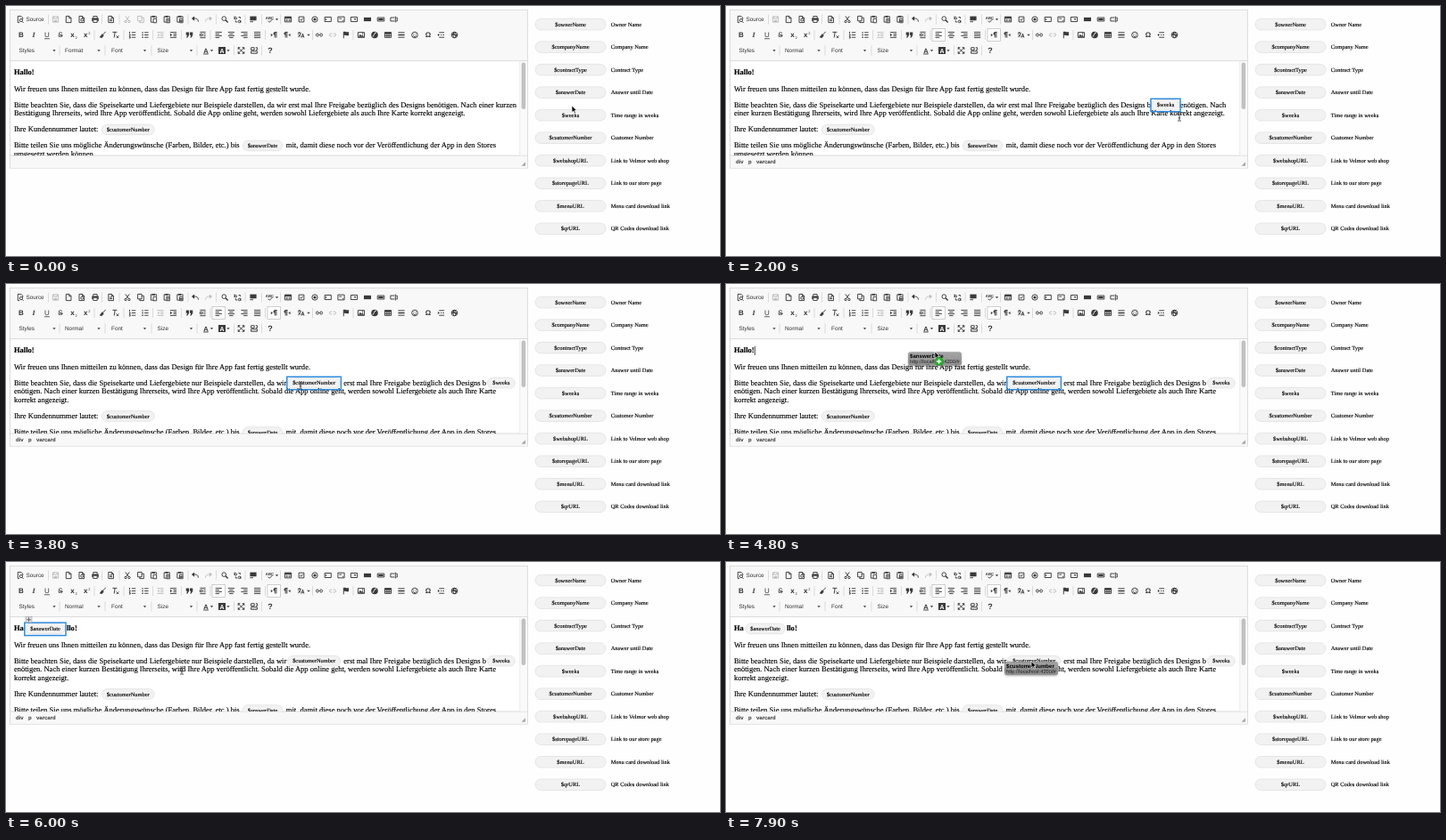
These frames come from a looping animation (800 by 281 pixels, 8 s). An HTML page:

```html
<!DOCTYPE html>
<html lang="de">
<head>
<meta charset="utf-8">
<title>Template editor</title>
<style>
html, body { margin: 0; width: 100%; height: 100%; overflow: hidden; background: #fefefe; }
svg { display: block; width: 100%; height: 100%; }
text { text-rendering: geometricPrecision; white-space: pre; fill: #000; }
.body { font: 8.52px "Liberation Serif", "Times New Roman", serif; stroke: #000; stroke-width: .14; }
.small { font: 6.45px "Liberation Serif", "Times New Roman", serif; stroke: #000; stroke-width: .14; }
.ui { font: 6.4px "Liberation Sans", Arial, sans-serif; fill: #333; }
.b { font-weight: bold; }
.mid { text-anchor: middle; }
.pill { fill: #f2f2f2; stroke: #dfdfdf; stroke-width: .7; }
.line { fill: none; stroke: #3a3a3a; stroke-width: 1.05; }
.solid { fill: #3a3a3a; }
.off { opacity: .3; }
.sep { stroke: #cfcfcf; stroke-width: .7; }
.sel { fill: none; stroke: #2f8ce0; stroke-width: 1.5; }
</style>
</head>
<body>
<svg id="stage" viewBox="0 0 800 281" xmlns="http://www.w3.org/2000/svg"></svg>
<script>
const text = (x, y, s, cls, style = '') => `<text x="${x}" y="${y}" class="${cls}" style="${style}">${s}</text>`;
const rect = (x, y, w, h, attrs) => `<rect x="${x}" y="${y}" width="${w}" height="${h}" ${attrs}/>`;
const ring = (x, y, r) => `M${x - r} ${y}a${r} ${r} 0 1 0 ${2 * r} 0a${r} ${r} 0 1 0 ${-2 * r} 0z`;
const box = (x, y, w, h) => `M${x} ${y}h${w}v${h}h${-w}z`;
const group = (id, inner, show) => `<g id="${id}" ${show ? '' : 'display="none"'}>${inner}</g>`;

// ---- toolbar ----
const ROWS = [15, 32.5, 50];
const icon = (row, x, line, solid = '', id = '', off = false) =>
  `<g ${id && `id="${id}"`} ${off ? 'class="off"' : ''} transform="translate(${x} ${ROWS[row]}) scale(.9)">` +
  `<path class="line" d="${line}"/><path class="solid" d="${solid}"/></g>`;
const glyph = (row, x, s, style = '') => text(x, ROWS[row] + 2.9, s, 'ui mid', 'font-size:8px;' + style);
const seps = (row, xs) => xs.map(x =>
  `<path class="sep" d="M${x} ${ROWS[row] - 5.5}v11"/>`).join('');
const arrow = (row, x) => `<path class="solid" d="M${x - 1.7} ${ROWS[row] - .8}h3.4l-1.7 2z"/>`;

const PAGE = 'M-3-4h4l2.3 2.3V4h-6.3zM.8-4v2.5h2.5';
const CLIP = 'M-1-3.5h-2.5v7h3M1.5-3.5h2v2M-.5-.8h4v5h-4z';
const CLIP_TOP = box(-2, -4.5, 3.6, 2);
const FRAME = box(-4, -3.2, 8, 6.4);
const UNDO = 'M3.8 3C4-.6 1-1.4-2-1.1', UNDO_TIP = 'M-4.6-1l3.6-3v6z';
const REDO = 'M-3.8 3C-4-.6-1-1.4 2-1.1', REDO_TIP = 'M4.6-1l-3.6-3v6z';

function rowOne() {
  return icon(0, 16, 'M-3-4h4l2 2V0M-3-4v8h2' + ring(1, 1.2, 1.8) + 'M2.3 2.6l1.7 1.7') +
    text(22.4, 17.4, 'Source', 'ui') +
    icon(0, 55.5, box(-3.5, -3.5, 7, 7) + 'M-2-3.5v2.6h4v-2.6', box(-2, 1, 4, 2.5), '', true) +
    icon(0, 70, PAGE) +
    icon(0, 84.7, PAGE + ring(.6, .8, 1.6)) +
    icon(0, 100, 'M-2.4-1.5v-2.3h4.8v2.3M-2.4 1.2v2.6h4.8v-2.6', 'M-4.2-1.8h8.4v4.4h-1.5v-1.8h-5.4v1.8h-1.5z') +
    icon(0, 117.5, PAGE + 'M-1.6 0h3.4M-1.6 1.8h3.4') +
    icon(0, 136, 'M-2.5-4L1.6 1.6M2.5-4L-1.6 1.6' + ring(-2.2, 2.8, 1.3) + ring(2.2, 2.8, 1.3), '', 'cut', true) +
    icon(0, 151, box(-3.8, -4, 5, 6) + 'M1.2-2h2.5v6h-5v-2', '', 'copy', true) +
    icon(0, 165.5, CLIP, CLIP_TOP) +
    icon(0, 180.3, CLIP + 'M.4 1h2.2M1.5 1v2.2', CLIP_TOP) +
    icon(0, 195, CLIP + 'M.3 1l.7 2 .6-2 .6 2 .6-2', CLIP_TOP) +
    icon(0, 212, UNDO, UNDO_TIP) + icon(0, 227, REDO, REDO_TIP, '', true) +
    icon(0, 245, ring(-.8, -1, 2.6), 'M.5 1.5l1.1-1.1 3 2.9-1.2 1.2z') +
    icon(0, 259.5, 'M-3.8-4v4' + ring(-2.3, -1.3, 1.3) + ring(2.2, 2.7, 1.4) + 'M3.7 1.1v3.2M-2.5 1.5v1.8h2.3M1.2-2.8h2v1.8') +
    icon(0, 277, 'M-4 3h4', box(-4, -3.8, 8, 5.2)) +
    text(295.5, 14.6, 'ABC', 'ui mid b', 'font-size:4.3px') +
    icon(0, 296, 'M-2.5 1.8l1.8 1.8 3.6-3.8') + arrow(0, 303.5) +
    icon(0, 316, FRAME + 'M-2.5.3h2M.8.3h2M-2.5 1.9h2M.8 1.9h2', box(-4, -3.2, 8, 2.2)) +
    icon(0, 331, box(-3.2, -3.2, 6.4, 6.4) + 'M-1.6 0l1.2 1.4 2.2-2.9') +
    icon(0, 346, ring(0, 0, 3.5), ring(0, 0, 1.8)) +
    icon(0, 360.7, box(-4, -2.8, 8, 5.6) + 'M-2.3-1.2v2.4') +
    icon(0, 375.5, FRAME + 'M-2.4-1h3', 'M3 .6v1.7h-1.7z') +
    icon(0, 390, box(-4, -2.8, 8, 5.6), 'M-.4-1h3.2l-1.6 2z') +
    icon(0, 405, '', box(-4.5, -2.4, 9, 4.8)) +
    icon(0, 420, box(-4.2, -2.2, 8.4, 4.4), box(-3, -1.2, 6, 2.4)) +
    icon(0, 434.5, 'M1-2.2h-5v4.4h5M3-2.2h1.2v4.4h-1.2M2-3.8v7.6') +
    seps(0, [47.5, 107.5, 127, 204, 235.5, 268, 286.5, 307.5]);
}

function rowTwo() {
  const lines = (x, w) => 'M-4-3.4h8M-4 1.1h8' + `M${x}-1.1h${w}M${x} 3.4h${w}`;
  const para = 'M1-3.4v6.8M2.8-3.4v6.8M3.6-3.4H.6', bowl = 'M1-3.6a2 2 0 0 0 0 4z';
  return group('active',
      [231, 293].map(x => rect(x, 25.5, 14.5, 14, 'fill="#fff" stroke="#bcbcbc" stroke-width=".7"')).join('')) +
    glyph(1, 17, 'B', 'font-weight:bold') +
    glyph(1, 31, 'I', 'font-style:italic;font-weight:bold;font-family:\'Liberation Serif\',serif') +
    glyph(1, 46, 'U', 'text-decoration:underline') + glyph(1, 61, 'S', 'text-decoration:line-through') +
    glyph(1, 74.5, 'x', 'font-weight:bold') + text(77.4, 37.2, '2', 'ui', 'font-size:4px') +
    glyph(1, 89.3, 'x', 'font-weight:bold') + text(92.2, 32, '2', 'ui', 'font-size:4px') +
    icon(1, 108.5, 'M3.5-4L0-.2', 'M-.8-1.4L1.4.8-1.2 4-4.2 3z') +
    icon(1, 123, 'M-4-3.5h5.5M-1-3.5l-1 6.8M.7 1l3 3M3.7 1l-3 3') +
    icon(1, 141.5, 'M-.8-3h5M-.8 0h5M-.8 3h5M-3.3-4v2.2M-4-.5h1.4v1.2h-1.4M-4 2.2h1.4v1.8h-1.4') +
    icon(1, 156, 'M-1-3h5M-1 0h5M-1 3h5', box(-4, -3.7, 1.5, 1.5) + box(-4, -.7, 1.5, 1.5) + box(-4, 2.3, 1.5, 1.5)) +
    icon(1, 173, 'M-4-3.2h8M0-1h4M0 1h4M-4 3.2h8', 'M-1.5-2v4l-2.4-2z', '', true) +
    icon(1, 187.5, 'M-4-3.2h8M0-1h4M0 1h4M-4 3.2h8', 'M-3.9-2v4l2.4-2z') +
    icon(1, 205.5, '', 'M-4.2-3.2h3.7v3.4l-1.8 3.1h-1.5l1.1-2.9h-1.5zM.5-3.2h3.7v3.4l-1.8 3.1h-1.5l1.1-2.9h-1.5z') +
    icon(1, 220.5, 'M-3.5-3.5h7M-3.5 3.5h7M-3.5-1.2h3v2.4h-3zM1-1.2h2.5M1 1.2h2.5') +
    icon(1, 238.2, lines(-4, 5)) + icon(1, 252.4, lines(-2.5, 5)) +
    icon(1, 267, lines(-1, 5)) + icon(1, 281.6, lines(-4, 8)) +
    icon(1, 300.4, para, bowl + 'M-4-1.8l2.4 1.9-2.4 1.9z') +
    icon(1, 315, 'M-2-3.4v6.8M-.2-3.4v6.8M.6-3.4h-3', 'M-2-3.6a2 2 0 0 0 0 4zM4-1.8l-2.4 1.9 2.4 1.9z') +
    icon(1, 330.5, 'M-4-2.5h4M-2-3.8v1.3M-3.7 2.5c2-.6 3-2.5 3.2-5M-3.4-1c.6 1.6 1.6 2.6 3 3.2M.6 3.4l1.6-5 1.6 5M1.2 1.8h2') + arrow(1, 339) +
    icon(1, 351, 'M-.8-1.6h-1.6a1.6 1.6 0 0 0 0 3.2h1.6M.8-1.6h1.6a1.6 1.6 0 0 1 0 3.2h-1.6M-1.8 0h3.6') +
    icon(1, 366, 'M-.8-1.6h-1.6a1.6 1.6 0 0 0 0 3.2h1.6M.8-1.6h1.6a1.6 1.6 0 0 1 0 3.2h-1.6', '', '', true) +
    icon(1, 381, 'M-3-4v8.2', 'M-3-3.8c2-1 3 1 6.4 0v4.4c-3 1-4.4-1-6.4 0z') +
    icon(1, 398, FRAME, 'M-3.4 2.6l2-3.4 1.8 2 1.2-1.4 1.8 2.8z' + ring(1.8, -1.6, .8)) +
    icon(1, 413, '', ring(0, 0, 4.2) + 'M2.4-2.6c-3 0-2.6 5-5 5.2v-1c1.6-.3 1.6-5 5-5.2z') +
    icon(1, 428, FRAME + 'M-4 1h8M-1.3-2v5.2M1.3-2v5.2', box(-4, -3.2, 8, 2.2)) +
    icon(1, 443, 'M-4-3h8M-4 3h8', box(-4, -.8, 8, 1.6)) +
    icon(1, 458, ring(0, 0, 3.7) + 'M-2 .8c.8 1.8 3.2 1.8 4 0', ring(-1.3, -1.2, .6) + ring(1.3, -1.2, .6)) +
    glyph(1, 473, 'Ω', 'font-weight:bold') +
    icon(1, 487.5, 'M-2.5-3h6.5M-2.5 3h6.5M-.5 0h1.3M2 0h1.8', 'M-4-1.8l2.4 1.8-2.4 1.8z') +
    icon(1, 502.5, ring(0, 0, 3.7) + 'M-3.5 0h7M0-3.6c-2.3 2-2.3 5.2 0 7.2M0-3.6c2.3 2 2.3 5.2 0 7.2', 'M-2.6-2l2-1.2 1 1.8-1.6 1.8zM.6.6l2.4-.6-1 2.4z') +
    seps(1, [99, 132, 164.5, 196.5, 229, 290.5, 343.5, 389]);
}

function rowThree() {
  const combos = [[14.5, 'Styles', 54], [66, '', 104], [118, 'Font', 155.5], [169.5, 'Size', 207.5]];
  return combos.map(([x, s, a]) => text(x, 52.2, s, 'ui') + arrow(2, a)).join('') +
    group('fmtOld', text(66, 52.2, 'Format', 'ui'), true) + group('fmtNew', text(66, 52.2, 'Normal', 'ui')) +
    glyph(2, 224, 'A', 'font-weight:bold;font-size:7.5px') + icon(2, 224, 'M-3.2 4.4h6.4') + arrow(2, 230.5) +
    rect(238, 46, 8, 8, 'class="solid"') + glyph(2, 242, 'A', 'font-weight:bold;font-size:7px;fill:#fff') + arrow(2, 249) +
    icon(2, 263.5, 'M-3-3l6 6M3-3l-6 6', 'M-4.2-4.2h3.4l-3.4 3.4zM4.2-4.2v3.4l-3.4-3.4zM-4.2 4.2v-3.4l3.4 3.4zM4.2 4.2h-3.4l3.4-3.4z') +
    icon(2, 278, box(-3.8, -3.6, 4, 3) + box(-3.8, 1, 7.6, 2.6) + 'M2-3.6h1.8v3h-1.8') +
    glyph(2, 296, '?', 'font-weight:bold;font-size:9px') +
    seps(2, [60, 111, 163, 214, 255.5, 286.5]);
}

// ---- document ----
const PILL_W = { $weeks: 31, $answerDate: 44.4, $customerNumber: 59 };
const base = (para, extra) => +(77.4 + para * 18.1 + extra * 9.6).toFixed(2);
const pill = (x, y, name, w = PILL_W[name], h = 11.6) =>
  rect(x, y - h / 2, w, h, `rx="${h / 2}" class="pill"`) + text(x + w / 2, y + 2.1, name, 'small mid');
const put = (x, y, s) => text(x, y, s, 'body');
const chip = (x, y, name) => pill(x, y - 2.4, name);

const INTRO = 'Bitte beachten Sie, dass die Speisekarte und Liefergebiete nur Beispiele darstellen, da wir';
const MIDDLE = 'erst mal Ihre Freigabe bezüglich des Designs b';
const CONFIRM = 'Bestätigung Ihrerseits, wird Ihre App veröffentlicht. Sobald die App online geht, werden sowohl Liefergebiete als auch Ihre Karte';
const END = 'korrekt angezeigt.';
const LEFT = 8.9;

function tail(extra) {
  const a = base(3, extra), b = base(4, extra);
  return put(LEFT, a, 'Ihre Kundennummer lautet:') + chip(107.3, a, '$customerNumber') +
    put(LEFT, b, 'Bitte teilen Sie uns mögliche Änderungswünsche (Farben, Bilder, etc.) bis') +
    chip(265.3, b, '$answerDate') +
    put(313.8, b, 'mit, damit diese noch vor der Veröffentlichung der App in den Stores') +
    put(LEFT, base(4, extra + 1), 'umgesetzt werden können.');
}
const y0 = base(0, 0), y2 = base(2, 0), y3 = base(2, 1), y4 = base(2, 2);
const docs = [
  put(LEFT, y2, `${INTRO} ${MIDDLE}enötigen. Nach einer kurzen`) + put(LEFT, y3, `${CONFIRM} ${END}`) + tail(1),
  put(LEFT, y2, `${INTRO} ${MIDDLE}`) + chip(477, y2, '$weeks') + put(508.7, y2, 'enötigen. Nach') +
    put(LEFT, y3, `einer kurzen ${CONFIRM} ${END}`) + tail(1),
  put(LEFT, y2, INTRO) + chip(315.6, y2, '$customerNumber') + put(378.3, y2, MIDDLE) + chip(539.4, y2, '$weeks') +
    put(LEFT, y3, `enötigen. Nach einer kurzen ${CONFIRM}`) + put(LEFT, y4, END) + tail(2),
];
const greetOld = text(LEFT, y0, 'Hallo!', 'body b');
const greetNew = text(LEFT, y0, 'Ha', 'body b') + chip(21.8, y0, '$answerDate') + text(67.9, y0, 'llo!', 'body b');
const handle = rect(22, 61.5, 7, 6.5, 'fill="#ddd" stroke="#999" stroke-width=".5"') +
  '<path d="M25.5 62.3v5M23 64.8h5" stroke="#555" stroke-width=".8"/>';

// ---- variable list ----
const FIELDS = [
  ['ownerName', 'Owner Name'], ['companyName', 'Company Name'], ['contractType', 'Contract Type'],
  ['answerDate', 'Answer until Date'], ['weeks', 'Time range in weeks'], ['customerNumber', 'Customer Number'],
  ['webshopURL', 'Link to Velmor web shop'], ['storepageURL', 'Link to our store page'],
  ['menuURL', 'Menu card download link'], ['qrURL', 'QR Codes download link'],
];
const fields = FIELDS.map(([name, label], i) => {
  const y = 20.6 + i * 25.52;
  return pill(593, y, '$' + name, 79, 12.6) + text(677.7, y + 2.1, label, 'small');
}).join('');

// ---- pointer and drag label ----
const ghost = '<g opacity=".88">' + rect(0, 0, 60, 15.5, 'rx="3" fill="url(#shade)" filter="url(#drop)"') + '</g>' +
  '<text id="dragName" x="2" y="6.9" class="ui b" style="font-size:6.1px;fill:#000"></text>' +
  text(2, 13.3, 'http://localhost:4200/#', 'ui', 'font-size:5.7px;fill:#222');
const badge = '<circle cx="4.6" cy="11" r="4.7" fill="#27b32c" stroke="#148a1a" stroke-width=".5"/>' +
  '<path d="M2 11h5.2M4.6 8.4v5.2" stroke="#fff" stroke-width="1.4"/>';
const ARROW = 'M0 0v7.6l1.8-1.6 1.2 2.7 1.3-.6-1.2-2.6h2.5z';
const BEAM = 'M-2-4.2q1.6 0 2 .8q.4-.8 2-.8M0-3.4v6.8M-2 4.2q1.6 0 2-.8q.4.8 2 .8M-1.2.9h2.4';
const trail = [[11, 'div'], [25, 'p'], [34, 'varcard']].map(([x, s]) => text(x, 177.4, s, 'ui b', 'font-size:6px')).join('');

const stage = document.getElementById('stage');
stage.innerHTML =
  `<defs><clipPath id="page">${rect(5, 62, 571, 106, '')}</clipPath>
  <linearGradient id="shade" x2="0" y2="1"><stop stop-color="#999"/><stop offset="1" stop-color="#808080"/></linearGradient>
  <filter id="drop" x="-20%" y="-50%" width="140%" height="220%"><feDropShadow dx="0" dy="1" stdDeviation="1.1" flood-opacity=".3"/></filter></defs>` +
  rect(4.5, 4.5, 579.8, 177.6, 'fill="#fff" stroke="#d1d1d1" stroke-width=".8"') +
  rect(4.9, 4.9, 579, 56.6, 'fill="#f8f8f8"') + rect(4.9, 168, 579, 13.7, 'fill="#f8f8f8"') +
  '<path d="M4.5 61.6h580M4.5 168h580" stroke="#d1d1d1" stroke-width=".8"/>' +
  rect(575.8, 62, 8, 105.6, 'fill="#fafafa"') + '<path d="M575.8 62v105.6" stroke="#e6e6e6" stroke-width=".7"/>' +
  rect(577.6, 63.5, 4.6, 52.5, 'rx="2.3" fill="#c1c1c1"') +
  '<path d="M582 175.2v4.6h-4.6z" fill="#a9a9a9"/>' +
  rowOne() + rowTwo() + rowThree() +
  '<g clip-path="url(#page)">' +
  group('greetOld', greetOld, true) + group('greetNew', greetNew) +
  put(LEFT, base(1, 0), 'Wir freuen uns Ihnen mitteilen zu können, dass das Design für Ihre App fast fertig gestellt wurde.') +
  docs.map((d, i) => group('doc' + i, d, !i)).join('') +
  '<rect id="sel" class="sel"/><path id="caret" stroke="#111" stroke-width=".8"/></g>' +
  group('handle', handle) + group('trail', trail) + fields + group('ghost', ghost) +
  `<g id="mouse"><path id="arrow" d="${ARROW}" fill="#000" stroke="#fff" stroke-width=".7"/>` +
  `<path id="beam" d="${BEAM}" fill="none" stroke="#222" stroke-width=".8"/>${group('badge', badge)}</g>`;

// ---- timeline: time, x, y, label lag ----
const PATH = [
  [0, 634, 112], [100, 635, 115], [300, 634, 123], [400, 634, 123], [700, 641, 124], [800, 641, 124],
  [900, 627, 124], [1100, 545, 127, 4], [1200, 499, 124.5, 3], [1400, 475, 111], [1700, 475, 111],
  [2000, 508, 125], [2300, 605, 145], [2500, 628, 147], [2600, 604, 148], [2800, 400, 122],
  [2900, 315, 112], [3100, 315, 111], [3400, 262, 100], [3600, 224, 101], [3800, 330, 114],
  [4100, 610, 104], [4200, 646, 100], [4300, 646, 99], [4500, 500, 95], [4800, 234, 76],
  [5000, 90, 70], [5200, 33, 70], [5400, 25, 71], [5600, 45, 88], [6000, 197, 122], [6100, 394, 147],
  [6400, 595, 150], [6600, 629, 148], [6700, 629, 148], [7000, 565, 150], [7100, 387.5, 150.5, 12],
  [7200, 300, 154], [7400, 215, 140], [7600, 240, 124], [7900, 342, 111.5],
];
const DRAGS = [
  [900, 1700, '$weeks'], [2600, 3100, '$customerNumber'], [4200, 5400, '$answerDate'], [6700, 8000, '$customerNumber'],
];
const CARETS = [
  [1000, 1300, 9.5, 139], [1300, 1700, 475, 111.5], [2700, 2900, 9.5, 139], [2900, 3100, 315.3, 111.5],
  [4500, 4800, 341, 93], [4800, 5000, 32.3, 75], [5000, 5400, 20.5, 75], [6900, 7200, 161, 149], [7200, 7700, 9.5, 149],
];
const SELECTED = [
  [1700, 2600, 476, 104.3, 33], [3100, 5400, 314.8, 104.3, 60.6], [5400, 7300, 20.8, 68.2, 46.2],
];

const $ = id => document.getElementById(id);
const show = (id, on) => on ? $(id).removeAttribute('display') : $(id).setAttribute('display', 'none');
const during = (rows, t) => rows.find(r => t >= r[0] && t < r[1]);

function pointer(t) {
  let i = PATH.findIndex(p => p[0] > t);
  if (i < 0) i = PATH.length;
  const a = PATH[i - 1], b = PATH[i] || a;
  const k = b === a ? 0 : (t - a[0]) / (b[0] - a[0]);
  return [1, 2, 3].map(n => (a[n] || 0) + ((b[n] || 0) - (a[n] || 0)) * k);
}

function draw(ms) {
  const t = Math.floor(ms % 8000 / 100) * 100;
  const [x, y, lag] = pointer(t);
  const drag = during(DRAGS, t), caret = during(CARETS, t), sel = during(SELECTED, t);
  const doc = t < 1700 ? 0 : t < 3100 ? 1 : 2, focused = doc > 0;

  docs.forEach((d, i) => show('doc' + i, i === doc));
  show('greetOld', t < 5400);
  show('greetNew', t >= 5400);
  show('fmtOld', !focused);
  ['fmtNew', 'active', 'trail'].forEach(id => show(id, focused));
  ['cut', 'copy'].forEach(id => $(id).setAttribute('class', focused ? '' : 'off'));
  show('handle', t >= 5400 && t < 6100);

  show('sel', sel);
  if (sel) [['x', sel[2]], ['y', sel[3]], ['width', sel[4]], ['height', 14.4]].forEach(([k, v]) => $('sel').setAttribute(k, v));
  show('caret', caret);
  if (caret) $('caret').setAttribute('d', `M${caret[2]} ${caret[3] - 5}v10`);

  show('ghost', drag);
  if (drag) {
    $('dragName').textContent = drag[2];
    $('ghost').setAttribute('transform', `translate(${x - 30 + lag} ${y + .2})`);
  }
  const beam = !drag && x < 576 && y > 62 && y < 168;
  show('arrow', !beam);
  show('beam', beam);
  show('badge', drag && x < 576 && t < 7800);
  $('mouse').setAttribute('transform', `translate(${x} ${y})`);
}

function tick() {
  draw(performance.now());
  requestAnimationFrame(tick);
}
tick();
</script>
</body>
</html>
```
